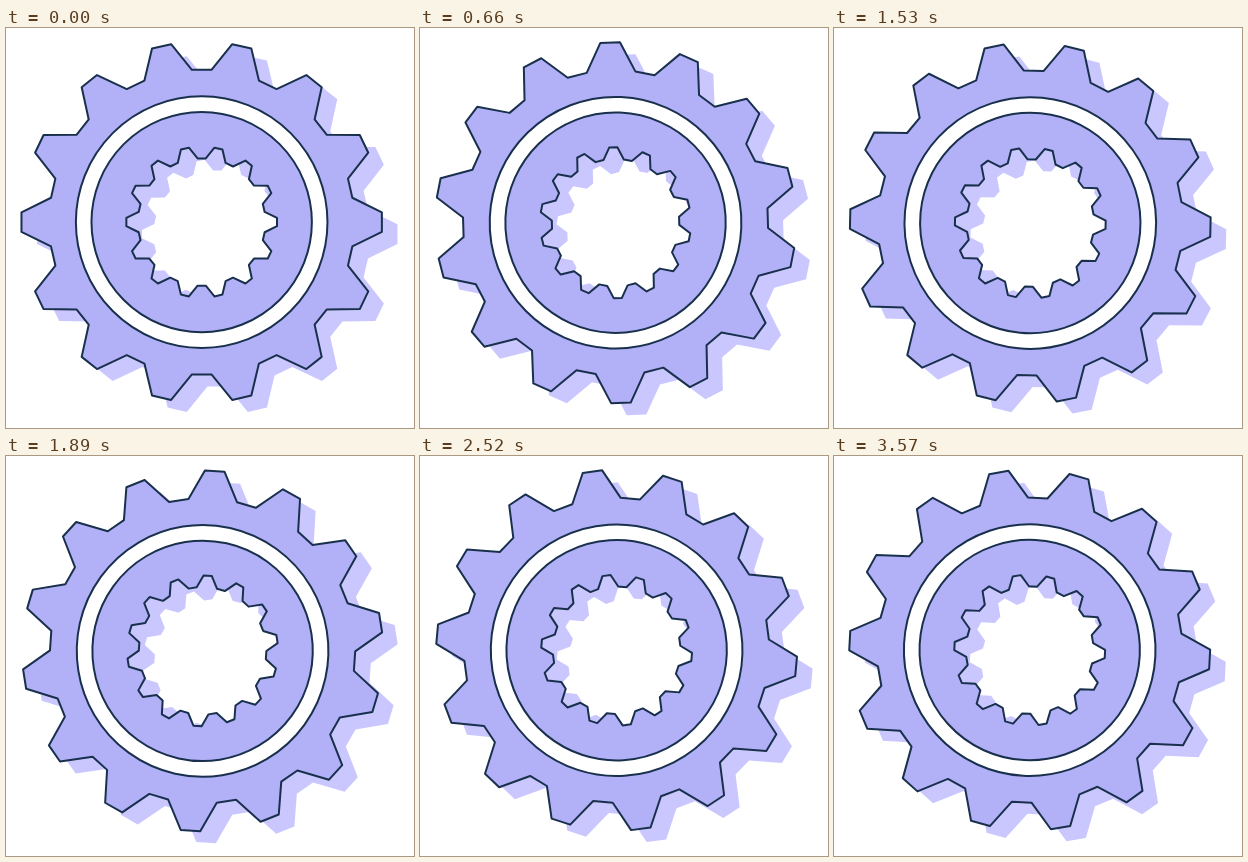
Write an HTML page that moves like this. It is 408x400 px and loops after 3600 ms.

```html
<!DOCTYPE html>
<html lang="en">
<head>
<meta charset="utf-8">
<title>Turning gear</title>
<style>
html, body { margin: 0; width: 100%; height: 100%; overflow: hidden; background: #fff; }
svg { display: block; }
.body { fill: #b2b0f7; stroke: #19304d; stroke-width: 2; stroke-linejoin: round; }
.shadow { fill: #cac7ff; }
.ring { fill: #fff; stroke: #19304d; stroke-width: 2; }
</style>
</head>
<body>
<svg width="408" height="400" viewBox="0 0 408 400">
  <path id="shadow" class="shadow" fill-rule="evenodd"/>
  <path id="body" class="body" fill-rule="evenodd"/>
  <path id="ring" class="ring" fill-rule="evenodd"/>
</svg>
<script>
const LOOP = 3600, STEP = 30, TEETH = 14;
const CX = 196.1, CY = 194.5, WOBBLE = 0.6;
const SHADOW_X = 15.6, SHADOW_Y = 12;
const TIP = 180.2, ROOT = 152.3, HALF = 9.8, HOLE = 0.418;
const el = id => document.getElementById(id);

// Closed outline with flat tips and flat valleys of equal width.
function outline(scale) {
  const points = [];
  for (let i = 0; i < TEETH * 2; i++) {
    const a = i * Math.PI / TEETH, r = i % 2 ? ROOT : TIP;
    for (const h of [-HALF, HALF]) {
      const x = (r * Math.cos(a) - h * Math.sin(a)) * scale;
      const y = (r * Math.sin(a) + h * Math.cos(a)) * scale;
      points.push(x.toFixed(2) + ' ' + y.toFixed(2));
    }
  }
  return 'M' + points.join('L') + 'Z';
}

const circle = r => `M${-r} 0a${r} ${r} 0 1 0 ${2 * r} 0a${r} ${r} 0 1 0 ${-2 * r} 0Z`;

const gear = outline(1) + outline(HOLE);
el('shadow').setAttribute('d', gear);
el('body').setAttribute('d', gear);
el('ring').setAttribute('d', circle(125.8) + circle(110.2));

function draw(time) {
  const t = Math.floor((time + 0.01) / STEP) * STEP % LOOP;
  const deg = -360 * t / LOOP;
  const phase = (deg - 135) * Math.PI / 180;
  const x = CX + WOBBLE * Math.cos(phase);
  const y = CY + WOBBLE * Math.sin(phase);
  const place = (id, dx, dy) =>
    el(id).setAttribute('transform', `translate(${x + dx} ${y + dy}) rotate(${deg})`);
  place('shadow', SHADOW_X, SHADOW_Y);
  place('body', 0, 0);
  place('ring', 0, 0);
}

function tick(now) {
  draw(now);
  requestAnimationFrame(tick);
}
draw(0);
requestAnimationFrame(tick);
</script>
</body>
</html>
```
